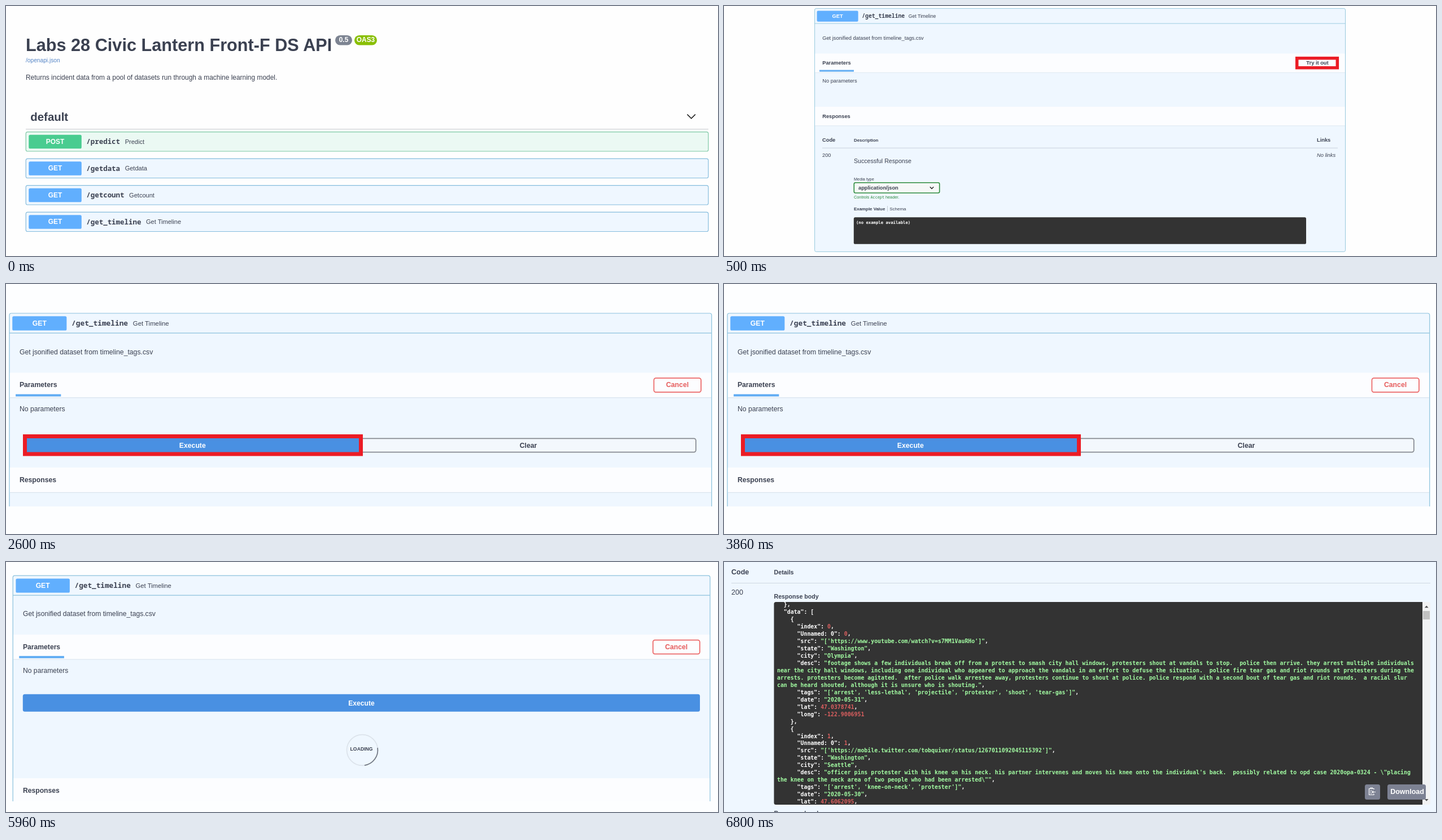
Animation of 1261 by 444 pixels, one loop 8 s. Source, as an HTML page:

```html
<!DOCTYPE html>
<html lang="en">
<head>
<meta charset="utf-8">
<title>API docs walkthrough</title>
<style>
  html, body { margin: 0; width: 100%; height: 100%; overflow: hidden; background: #fefefe; }
  #stage { position: relative; width: 100%; height: 100%; overflow: hidden; contain: strict; }
  #film { position: absolute; left: 0; top: 0; animation: cut 8s step-end infinite; }
  #film > svg { display: block; width: 1261px; height: 444px; overflow: hidden; }
  @keyframes cut {
    0% { top: 0; }
    6.25% { top: -444px; }
    32.5% { top: -888px; }
    58.75% { top: -1332px; }
    85% { top: -1776px; }
  }
  text { font-family: "Liberation Sans", Arial, sans-serif; fill: #3b4151; white-space: pre; }
  .b { font-weight: 700; }
  .i { font-style: italic; }
  .m { text-anchor: middle; }
  .mono { font-family: "Noto Sans Mono", "DejaVu Sans Mono", monospace; font-weight: 700; }
  .code { font-family: "DejaVu Sans Mono", monospace; font-weight: 700; }
  .thin { font-weight: 400; }
  .w { fill: #fff; }
  .str { fill: #a2fca2; }
  .num { fill: #d95f5f; }
  .green { fill: #2b8a3a; }
  .red { fill: #e65c5c; }
  .link { fill: #5585c6; }
</style>
</head>
<body>
<div id="stage"><div id="film"></div></div>
<script>
const BLUE = '#61affe', GREEN = '#49cc90', TINT = '#eff7ff', DARK = '#333', RED = '#eb1c25';

const text = (x, y, size, str, cls = '') =>
  `<text x="${x}" y="${y}" font-size="${size}" class="${cls}">${str}</text>`;
const box = (x1, y1, x2, y2, fill, r = 0, stroke = 'none', sw = 1) =>
  `<rect x="${x1}" y="${y1}" width="${x2 - x1}" height="${y2 - y1}" rx="${r}" fill="${fill}" stroke="${stroke}" stroke-width="${sw}"/>`;
const line = (points, stroke, sw = 1) =>
  `<polyline points="${points}" fill="none" stroke="${stroke}" stroke-width="${sw}"/>`;
const scene = (bg, ...parts) =>
  `<svg viewBox="0 0 1261 444">${box(0, 0, 1261, 444, bg)}${parts.join('')}</svg>`;
const clip = (h, body) => `<svg width="1261" height="${h}" overflow="hidden">${body}</svg>`;
const place = (x, y, s, body) => `<g transform="translate(${x} ${y}) scale(${s})">${body}</g>`;

// One operation box, in unscaled page units
function operation(w, h, method, path, summary, edge) {
  const post = method === 'POST';
  return box(0, 0, w, h, post ? '#ebf9f3' : TINT, 4, edge, 1.4)
    + box(6, 6, 116, 35, post ? GREEN : BLUE, 3)
    + text(61, 25, 14, method, 'b w m')
    + text(126, 25.6, 14.67, path, 'mono')
    + text(136 + path.length * 8.8, 25, 13, summary);
}

const strip = (y, w, title) =>
  box(1, y, w - 1, y + 50.5, '#fcfdff')
  + line(`1,${y + 50.8} ${w - 1},${y + 50.8}`, '#d9e4ee', 1.2)
  + text(20.5, y + 29.5, 14, title, 'b');

const timeline = (w, h, responsesY, edge) =>
  operation(w, h, 'GET', '/get_timeline', 'Get Timeline', edge)
  + line(`0,40.2 ${w},40.2`, edge, 1.3)
  + text(20.5, 83, 14, 'Get jsonified dataset from timeline_tags.csv')
  + strip(120.7, w, 'Parameters')
  + box(12.7, 164.4, 104.5, 169, '#62adf3')
  + text(20.5, 198.6, 14, 'No parameters')
  + strip(responsesY, w, 'Responses');

const cancel = box(1306, 131.8, 1401.5, 160.3, 'none', 4, '#ec6868', 2)
  + text(1353.6, 150.4, 14, 'Cancel', 'b red m');

// Overview
const rows = [
  ['POST', '/predict', 'Predict'],
  ['GET', '/getdata', 'Getdata'],
  ['GET', '/getcount', 'Getcount'],
  ['GET', '/get_timeline', 'Get Timeline']
];
const overview = scene('#fefefe',
  text(35, 79.8, 30.66, 'Labs 28 Civic Lantern Front-F DS API', 'b'),
  box(583, 52, 613, 69.5, '#7d8492', 8.7),
  text(598, 64.3, 11.9, '0.5', 'b w m'),
  box(617, 52, 657, 69.5, '#89bf04', 8.7),
  text(637, 64.3, 11.9, 'OAS3', 'b w m'),
  text(35, 99.6, 10.2, '/openapi.json', 'link'),
  text(35, 130.6, 11.94, 'Returns incident data from a pool of datasets run through a machine learning model.'),
  text(43.3, 204.3, 20.4, 'default', 'b'),
  line('1206.5,192.5 1213.7,199.7 1220.9,192.5', '#111', 1.6),
  line('35,218.8 1244,218.8', '#c6c8cd'),
  ...rows.map((r, i) => place(35.2, 223.6 + i * 47.5, 0.85,
    operation(1422, 40.5, ...r, i ? '#84bcdd' : '#7cc8a4')))
);

// Opened operation
const opened = scene('#fefefe',
  place(160.6, 4.4, 0.664, timeline(1415.5, 650.5, 263, '#8fc5dc')),
  box(1014.7, 92.7, 1086.3, 109.7, '#fbfcfe', 0, RED, 5.5),
  text(1051, 104, 9.3, 'Try it out', 'b m'),
  text(174, 241.4, 9.3, 'Code', 'b'),
  text(230, 241.4, 7.9, 'Description', 'b'),
  text(1050, 241.4, 9.3, 'Links', 'b'),
  line('174,252.2 1087,252.2', '#c8d2dc'),
  text(174, 267.5, 9.3, '200'),
  text(1050, 267.5, 9.3, 'No links', 'i'),
  text(230, 279, 10.6, 'Successful Response'),
  text(230, 310, 7.3, 'Media type'),
  box(230.3, 313.8, 381.7, 332, '#f6f8f7', 2.5, '#2d8c3c', 1.6),
  text(238, 326, 9.3, 'application/json', 'b'),
  line('364.8,321.3 368,324.5 371.2,321.3', '#222', 1.4),
  text(230, 342.3, 7.3, 'Controls', 'green'),
  text(259.5, 342.3, 6.8, 'Accept', 'mono thin green'),
  text(286, 342.3, 7.3, 'header.', 'green'),
  text(230, 363, 7.9, 'Example Value', 'b'),
  line('289.5,355 289.5,365', '#c4ccd4'),
  text(293.3, 363, 7.97, 'Schema'),
  box(229.8, 375.3, 1031, 422.8, DARK, 2.6),
  text(234, 387, 7.27, '(no example available)', 'code w')
);

// Ready to run
const ready = scene('#fdfeff',
  clip(395, place(6, 52, 0.874, timeline(1423, 600, 313.5, '#8bc2dd') + cancel)),
  box(600, 274.3, 1221.8, 298.6, '#f3f8fd', 3.5, '#85898f', 1.7),
  text(925, 290.8, 12.24, 'Clear', 'b m'),
  box(33.5, 270.5, 628.5, 302, '#4990e2', 0, RED, 7),
  text(330.3, 290.8, 12.24, 'Execute', 'b w m')
);

// Waiting for the response
const loading = scene('#fdfeff',
  clip(425, place(12.2, 24.2, 0.868, timeline(1422.5, 600, 414.5, '#8bc2dd') + cancel)),
  box(29.8, 234.7, 1229, 265.8, '#4990e2', 3.5),
  text(629.5, 254.8, 12.15, 'Execute', 'b w m'),
  '<circle cx="631" cy="334" r="27.4" fill="none" stroke="#dce3eb" stroke-width="1.7"/>',
  '<path d="M658.1 330A27.4 27.4 0 0 1 635 361.1" fill="none" stroke="#737984" stroke-width="1.8"/>',
  text(629.6, 335, 8.7, 'LOADING', 'b m')
);

// Response listing
const json = String.raw`  },
  "data": [
    {
      "index": 0,
      "Unnamed: 0": 0,
      "src": "['https://www.youtube.com/watch?v=s7MM1VauRHo']",
      "state": "Washington",
      "city": "Olympia",
      "desc": "footage shows a few individuals break off from a protest to smash city hall windows. protesters shout at vandals to stop.  police then arrive. they arrest multiple individuals
near the city hall windows, including one individual who appeared to approach the vandals in an effort to defuse the situation.  police fire tear gas and riot rounds at protesters during the
arrests. protesters become agitated.  after police walk arrestee away, protesters continue to shout at police. police respond with a second bout of tear gas and riot rounds.  a racial slur
can be heard shouted, although it is unsure who is shouting.",
      "tags": "['arrest', 'less-lethal', 'projectile', 'protester', 'shoot', 'tear-gas']",
      "date": "2020-05-31",
      "lat": 47.0378741,
      "long": -122.9006951
    },
    {
      "index": 1,
      "Unnamed: 0": 1,
      "src": "['https://mobile.twitter.com/tobquiver/status/1267011092045115392']",
      "state": "Washington",
      "city": "Seattle",
      "desc": "officer pins protester with his knee on his neck. his partner intervenes and moves his knee onto the individual's back.  possibly related to opd case 2020opa-0324 - \"placing
the knee on the neck area of two people who had been arrested\"",
      "tags": "['arrest', 'knee-on-neck', 'protester']",
      "date": "2020-05-30",
      "lat": 47.6062095,`;

function codeLine(src, i) {
  const [, key = '', value, comma] = src.match(/^(\s*"[^"]+": )?(.*?)(,?)$/);
  const cls = /^\s*[{}[]/.test(value) ? 'w' : /^-?\d/.test(value) ? 'num' : 'str';
  return text(94, 79.4 + i * 12.95, 9.87,
    `${key}<tspan class="${cls}">${value}</tspan>${comma}`, 'code w');
}

const response = scene(TINT,
  text(13, 22.3, 12.5, 'Code', 'b'),
  text(88.5, 22.3, 10.7, 'Details', 'b'),
  line('13,37.5 1251,37.5', '#cfd8e1'),
  text(13, 57.5, 12.5, '200'),
  text(88.5, 64.8, 10.65, 'Response body', 'b'),
  box(1230, 71, 1251, 431, '#f1f2f3', 3),
  box(88.5, 71, 1240, 431, DARK, 3.5),
  box(1237, 71, 1247, 431, '#f1f2f3'),
  '<path d="M1240.8 81.2l3.4-3.8 3.4 3.8zM1240.8 421l3.4 3.8 3.4-3.8z" fill="#505050"/>',
  box(1238, 87, 1250, 102, '#c1c1c1'),
  '<svg y="71" width="1237" height="360" viewBox="0 71 1237 360" overflow="hidden">',
  ...json.split('\n').map(codeLine),
  '</svg>',
  box(1135, 395, 1162, 422, '#7d8293', 3.5),
  '<path d="M1151 404v-1.500h-8.500v11h8.500v-2M1145 402.500v-1.500h3.500v1.500M1154 408.500h-6m2-2l-2 2 2 2M1144.500 406h3m-3 2.500h1.500m-1.500 2.500h3" fill="none" stroke="#fff" stroke-width="1.2"/>',
  box(1175, 395, 1243, 422, '#7d8293', 3.5),
  text(1210, 412, 12.5, 'Download', 'b w m'),
  text(88.5, 450, 10.65, 'Response headers', 'b')
);

document.getElementById('film').innerHTML = overview + opened + ready + loading + response;
</script>
</body>
</html>
```
